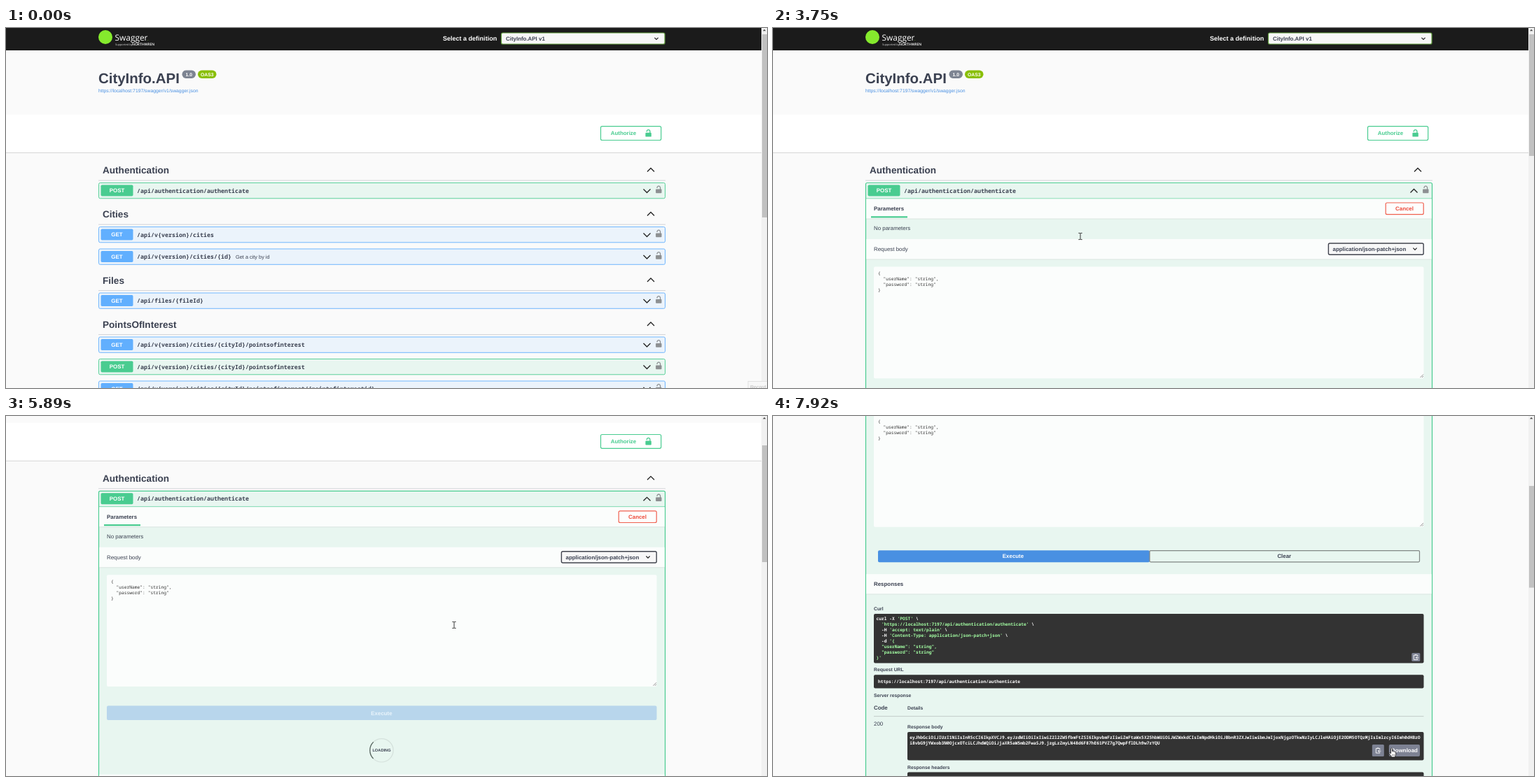
Write an HTML page that moves like this. It is 1087 by 515 pixels and loops after 7.99 s.

```html
<!DOCTYPE html>
<html lang="en">
<head>
<meta charset="utf-8">
<title>CityInfo.API</title>
<style>
html, body { margin: 0; width: 100%; height: 100%; overflow: hidden; background: #fafafa; }
svg { display: block; }
text { font-family: "Liberation Sans", Arial, sans-serif; white-space: pre; text-rendering: geometricPrecision; }
.mono { font-family: "Noto Sans Mono", monospace; }
.logo { font-family: "Open Sans", sans-serif; }
</style>
</head>
<body>
<svg id="stage" width="1087" height="515" viewBox="0 0 1087 515"></svg>
<script>
(() => {
const LOOP = 7990;
const INK = '#3b4151', GREEN = '#49cc90', BLUE = '#61affe', DARK = '#333', SLATE = '#7d8293', LIME = '#a2fca2';

const esc = s => s.replace(/&/g, '&amp;').replace(/</g, '&lt;');

// y is the middle of the capitals
function text(x, y, s, o = {}) {
  const { size = 7.92, fill = INK, w = 700, at = 'start', cls = '', extra = '' } = o;
  return `<text x="${x}" y="${(y + size * 0.35).toFixed(2)}" font-size="${size}" fill="${fill}" ` +
    `font-weight="${w}" text-anchor="${at}" class="${cls}" ${extra}>${o.raw ? s : esc(s)}</text>`;
}
const mid = (x, y, s, fill = INK, size = 7.92) => text(x, y, s, { fill, size, at: 'middle' });
const small = (x, y, s, o = {}) => text(x, y, s, { size: 6.8, ...o });
const code = (x, y, s, o = {}) => text(x, y, s, { size: 6.28, cls: 'mono', fill: '#fff', ...o });

function box(x1, y1, x2, y2, fill, o = {}) {
  const { r = 0, stroke = 'none', sw = 1.2, extra = '' } = o;
  return `<rect x="${x1}" y="${y1}" width="${x2 - x1}" height="${y2 - y1}" rx="${r}" ` +
    `fill="${fill}" stroke="${stroke}" stroke-width="${sw}" ${extra}/>`;
}
const line = (x1, x2, y, c, w = 0.7) => `<path d="M${x1} ${y}H${x2}" stroke="${c}" stroke-width="${w}"/>`;
const group = (inner, attrs = '') => `<g ${attrs}>${inner}</g>`;

function chevron(x, y, dir, w = 5, c = '#222', sw = 1.3) {
  const h = w / 2 * dir;
  return `<path d="M${x - w} ${y - h}L${x} ${y + h}L${x + w} ${y - h}" fill="none" stroke="${c}" stroke-width="${sw}"/>`;
}
function lock(x, y, c) {
  return `<g transform="translate(${x} ${y})"><rect x="-4.2" y="-.8" width="8.4" height="5.8" rx=".9" fill="${c}"/>` +
    `<path d="M-2.3 -2.2V-2.7a2.3 2.3 0 0 1 4.6 0V0" fill="none" stroke="${c}" stroke-width="1.3"/></g>`;
}
function clip(x, y, hw, hh) {
  return box(x - hw, y - hh, x + hw, y + hh, SLATE, { r: 1.5 }) +
    `<path d="M${x + 2.5} ${y - 1}V${y - 3}H${x - 3}V${y + 3.5}H${x + 2.5}V${y + 2.3}M${x + 4} ${y + .7}H${x}m1.4 -1.4l-1.4 1.4l1.4 1.4M${x - 1.4} ${y - 3.6}h2.4" ` +
    `fill="none" stroke="#fff" stroke-width=".9"/>`;
}

// Request rows
function bar(y, method, path, desc, open) {
  const c = method === 'POST' ? GREEN : BLUE;
  return (open ? '' : box(132.5, y - 11, 941.5, y + 11.3, c, { r: 2, stroke: c, sw: 0.9, extra: 'fill-opacity=".1"' })) +
    box(135.5, y - 8, 181.5, y + 8, c, { r: 1.7 }) + mid(158.5, y, method, '#fff') +
    text(187, y + 0.2, path, { size: 8.33, cls: 'mono' }) +
    (desc ? text(328, y, desc, { size: 7.35, w: 400 }) : '') +
    group(chevron(915.5, y + 0.5, open ? -1 : 1) + lock(932.3, y - 1.3, '#8d9092'), 'class="tail"') +
    group(clip(931.3, y, 4.8, 7.2), 'class="copy"');
}
const row = (y, ...rest) => group(bar(y, ...rest), `class="row" data-y="${y}"`);
const title = (y, s) => text(138, y, s, { size: 13.58 }) + chevron(921, y - 0.5, -1) +
  line(132, 942, y + 14.6, '#c0c2c7');

const AUTH = '/api/authentication/authenticate';
const CITIES = '/api/v{version}/cities';
const POINTS = CITIES + '/{cityId}/pointsofinterest';
const HOST = 'https://localhost:7197';

function header() {
  return box(0, -10, 1079, 32, '#1b1b1b') +
    '<circle cx="142" cy="13" r="10" fill="#85ea2d"/>' +
    text(155.5, 13.5, 'Swagger', { size: 11.9, fill: '#fff', w: 400, cls: 'logo' }) +
    text(202, 16, '.', { size: 6, fill: '#85ea2d', w: 400 }) +
    text(156, 23.5, 'Supported by', { size: 3.9, fill: '#ddd', w: 400, cls: 'logo' }) +
    text(180, 23.5, 'NORTHWREN', { size: 5, fill: '#fff', w: 600, cls: 'logo' }) +
    text(624, 14.5, 'Select a definition', { size: 9.03, fill: '#fff' }) +
    box(707.5, 7, 941, 23, '#f7f7f7', { r: 2, stroke: '#62a03f' }) +
    text(714, 15.2, 'CityInfo.API v1') + chevron(929, 15.2, 1, 2.6, '#222', 1.2) +
    text(132, 71.8, 'CityInfo.API', { size: 20.45 }) +
    box(251.5, 60.5, 271, 72, '#7d8492', { r: 5.7 }) + mid(261.3, 66.3, '1.0', '#fff', 6.8) +
    box(274, 60.5, 300.5, 72, '#89bf04', { r: 5.7 }) + mid(287.3, 66.3, 'OAS3', '#fff', 6.8) +
    small(132, 89.9, HOST + '/swagger/v1/swagger.json', { fill: '#4990e2', w: 400 }) +
    box(0, 124, 1079, 178, '#fff') + line(0, 1079, 178.5, '#d6d6d6', 1) +
    box(849.5, 140.7, 935.7, 160.5, '#fff', { r: 2, stroke: GREEN }) +
    mid(882, 150.6, 'Authorize', GREEN) + lock(917.6, 150.6, GREEN) +
    title(203.5, 'Authentication');
}

function rowList() {
  return row(232.5, 'POST', AUTH) +
    title(266.5, 'Cities') + row(295.5, 'GET', CITIES) + row(327, 'GET', CITIES + '/{id}', 'Get a city by id') +
    title(361, 'Files') + row(390, 'GET', '/api/files/{fileId}') +
    title(424, 'PointsOfInterest') + row(453, 'GET', POINTS) + row(484.5, 'POST', POINTS) +
    row(516, 'GET', POINTS + '/{pointofinterestid}');
}

const band = (y1, y2) => box(133, y1, 941, y2, '#fff', { extra: 'fill-opacity=".82"' }) + line(133, 941, y2, '#d5e0db', 0.8);

function panel() {
  return box(132.5, 221.5, 941.5, 1500, GREEN, { r: 2, stroke: GREEN, extra: 'fill-opacity=".1"' }) +
    row(232.5, 'POST', AUTH, '', true) + line(133, 941, 244, GREEN, 0.8) +
    band(244.4, 273) + text(144, 258.5, 'Parameters') + line(140, 192, 270.4, GREEN, 2.2) +
    text(144, 286, 'No parameters', { w: 400 }) +
    band(302, 331) + text(144, 316, 'Request body', { w: 400 }) +
    box(793.4, 308, 929.2, 324.2, '#f7f7f7', { r: 2, stroke: '#41444e', sw: 1.4 }) +
    text(799.5, 316, 'application/json-patch+json') + chevron(917, 316, 1, 2.6, '#222', 1.2);
}

const BODY = ['{', '  "userName": "string",', '  "password": "string"', '}'];
const span = (s, c) => `<tspan fill="${c}">${esc(s)}</tspan>`;

function responses(y) {
  return band(y, y + 28.7) + text(144, y + 14.2, 'Responses');
}
function table(y) {
  return responses(y) + text(144, y + 51.3, 'Code') + small(192, y + 51.3, 'Description') +
    text(897.5, y + 51.3, 'Links') + line(144, 929.5, y + 62.7, '#b3bdba') +
    text(144, y + 73.4, '200', { w: 400 }) + text(897, y + 73.4, 'No links', { w: 400, extra: 'font-style="italic"' });
}

function example() {
  const lines = BODY.map((s, i) => code(147.5, 368 + 8 * i,
    s.split(/(?<=: )("string")/).map(p => span(p, p === '"string"' ? LIME : '#fff')).join(''), { raw: true })).join('');
  return box(867.2, 250.2, 929.2, 266.8, '#fff', { r: 2, stroke: '#666' }) + mid(898.5, 258.5, 'Try it out') +
    small(144, 349.5, 'Example Value') + line(194.6, 195.2, 349.5, '#888', 6) + small(198.5, 349.5, 'Schema', { w: 400 }) +
    box(144, 360.5, 929.5, 401.7, DARK, { r: 2 }) + lines + table(436);
}

function editor() {
  return box(875.2, 250, 929.2, 266.7, '#fff', { r: 2, stroke: '#f0604f', extra: 'fill-opacity=".6"' }) +
    mid(902, 258.4, 'Cancel', '#ee4a3a') +
    box(144, 341.5, 929.5, 501.2, '#fff', { r: 2, extra: 'fill-opacity=".82"' }) +
    BODY.map((s, i) => code(150, 350.6 + 8 * i, s, { fill: '#333', w: 500 })).join('') +
    '<path d="M924.5 500l4.5 -4.5M927 500l2 -2" stroke="#777" stroke-width=".8"/>';
}

const wide = (c, label) => box(144, 528.6, 929.5, 549.2, c, { r: 2 }) + mid(536.5, 539, 'Execute', label);

function loading() {
  return wide('#b8d6ec', '#e9f4fb') + responses(627) +
    '<circle cx="536.5" cy="592.5" r="16.7" fill="none" stroke="#555" stroke-opacity=".13" stroke-width="1.2"/>' +
    '<path id="spin" d="M-11.8 -11.8A16.7 16.7 0 0 1 11.8 -11.8" fill="none" stroke="#52605a" stroke-width="1.2"/>' +
    mid(536.5, 592.5, 'LOADING', INK, 5.7);
}

// A made-up token with the usual three parts
function makeToken() {
  const claims = { sub: '1', given_name: 'Jonas', family_name: 'Veldt', city: 'Antwerp',
    nbf: 1683990722, exp: 1683994322, iss: HOST, aud: 'cityinfoapi' };
  const abc = 'ABCDEFGHIJKLMNOPQRSTUVWXYZabcdefghijklmnopqrstuvwxyz0123456789';
  let seed = 7, sign = '';
  while (sign.length < 43) {
    seed = (seed * 16807) % 2147483647;
    sign += abc[seed % abc.length];
  }
  const parts = [{ alg: 'HS256', typ: 'JWT' }, claims].map(o => btoa(JSON.stringify(o)).replace(/=/g, ''));
  return [...parts, sign].join('.');
}

function result() {
  const curl = ["curl -X 'POST' \\", `  '${HOST}${AUTH}' \\`, "  -H 'accept: text/plain' \\",
    "  -H 'Content-Type: application/json-patch+json' \\", "  -d '{", ...BODY.slice(1, 3), "}'"];
  let quoted = false;
  const lines = curl.map((s, i) => code(147.5, 632.6 + 8 * i, s.split(/(')/).map(p => {
    if (p !== "'") return span(p, quoted ? LIME : '#fff');
    quoted = !quoted;
    return span(p, LIME);
  }).join(''), { raw: true })).join('');
  const token = makeToken();
  return box(150, 534.6, 538, 551.6, '#4990e2', { r: 2 }) + mid(343, 543, 'Execute', '#fff') +
    box(538, 535, 923.5, 551.2, 'none', { r: 1.5, stroke: '#808684' }) + mid(730.3, 543, 'Clear') +
    responses(568.6) + small(144, 618.2, 'Curl') +
    box(144, 625.3, 929.5, 695.8, DARK, { r: 2 }) + lines + clip(918.3, 687.5, 6, 6) +
    small(144, 705.5, 'Request URL') + box(144, 712.6, 929.5, 732, DARK, { r: 2 }) +
    code(150, 722.4, HOST + AUTH) +
    small(144, 742, 'Server response') + text(144, 760, 'Code') + small(192, 760, 'Details') +
    line(144, 929.5, 772, '#b3bdba') + text(144, 782.5, '200', { w: 400 }) +
    small(192, 787.2, 'Response body') + box(192, 794.3, 929.5, 835, DARK, { r: 2 }) +
    code(195.3, 802, token.slice(0, 194)) + code(195.3, 810, token.slice(194)) +
    clip(864.3, 821, 8.5, 8.5) + box(879.8, 812.5, 924, 829.5, SLATE, { r: 2 }) + mid(902, 821, 'Download', '#fff') +
    small(192, 845, 'Response headers') + box(192, 852, 929.5, 900, DARK, { r: 2 });
}

// Pointers: tip at 0,0 (the text beam is centred)
const shapes = {
  arrow: '<path d="M0 0V9.6L2.2 7.6L3.6 10.8L5 10.2L3.6 7.1H6.6Z" fill="#fff" stroke="#222" stroke-width=".8"/>',
  hand: '<path d="M-1 .8Q0 -.6 1 .8V4.6Q2.2 4 2.8 5Q4.2 4.5 4.6 5.6Q6 5.3 6.2 6.6V9.4Q5.8 11 5.2 11.6V13H-.4V11.8L-3.6 7.6Q-3.4 6.2 -2.2 6.8L-1 8Z" fill="#fff" stroke="#222" stroke-width=".9"/>' +
    '<path d="M1 9v2M2.7 9v2M4.3 9v2" stroke="#222" stroke-width=".5"/>',
  beam: '<path d="M-2.6 -4.6H-.6L0 -4L.6 -4.6H2.6M0 -4V4M-2.6 4.6H-.6L0 4L.6 4.6H2.6" fill="none" stroke="#333" stroke-width="1"/>'
};

document.getElementById('stage').innerHTML =
  box(0, 0, 1087, 515, '#fafafa') +
  group(header() + group(rowList(), 'id="list"') +
    group(panel() + group(example(), 'id="example"') + group(editor(), 'id="editor"') +
      group(wide('#4990e2', '#fff') + table(561), 'id="ready"') +
      group(loading(), 'id="loading"') + group(result(), 'id="result"'), 'id="panel"') +
    '<rect id="focus" x="135.3" y="224.4" height="16.6" rx="1.5" fill="none" stroke="#22242e" stroke-width="1.4"/>', 'id="page"') +
  box(1079, 0, 1087, 515, '#f1f1f1') + '<path d="M1081 4.2L1083.2 1.8L1085.4 4.2Z" fill="#505050"/>' +
  '<rect id="thumb" x="1080" width="7" fill="#c1c1c1"/>' +
  group(box(1060, 505.5, 1090, 520, '#f7f7f7', { stroke: '#ddd', sw: 0.8 }) +
    group(text(1063, 513.2, 'Record', { size: 7, fill: '#b5b5b5', w: 400 }), 'id="label"'), 'id="tip"') +
  group(Object.entries(shapes).map(([k, s]) => group(s, `id="${k}"`)).join(''), 'id="pointer"');

const $ = id => document.getElementById(id);
const show = (el, on) => el.setAttribute('display', on ? 'inline' : 'none');
const rows = [...document.querySelectorAll('.row')].map(el => ({
  y: +el.dataset.y, tail: el.querySelector('.tail'), copy: el.querySelector('.copy')
}));

// time, x, y, pointer shape from then on
const track = [
  [230, 1068, 515, 'arrow'], [600, 968, 300, 'arrow'], [850, 908, 160, 'hand'], [960, 903, 151, 'hand'],
  [1150, 903, 151, 'hand'], [1350, 895, 175, 'arrow'], [1600, 881, 226, 'hand'], [1700, 880.5, 229, 'hand'],
  [1950, 880.5, 229, 'hand'], [2250, 889, 246, 'arrow'], [2500, 898, 256, 'hand'], [2740, 902, 261, 'hand'],
  [2800, 905.5, 258, 'hand'], [3120, 905.5, 258, 'arrow'], [3300, 760, 272, 'arrow'], [3400, 600, 350, 'beam'],
  [3680, 439, 298, 'beam'], [4300, 439, 298, 'beam'], [4600, 560, 388, 'hand'], [4750, 592, 421, 'hand'],
  [4900, 592, 421, 'arrow'], [5380, 592, 421, 'arrow'], [5560, 600, 387, 'beam'], [5680, 606, 353, 'beam'],
  [5790, 630, 312, 'beam'], [5890, 640, 299, 'beam'], [6190, 657, 291, 'beam'], [6700, 700, 277, 'beam'],
  [6960, 706, 272, 'arrow'], [7250, 711, 269, 'arrow'], [7500, 760, 290, 'arrow'], [7720, 853, 342, 'arrow'],
  [7860, 880, 450, 'arrow'], [7900, 883.5, 475, 'hand'], [LOOP, 883.5, 475, 'hand']
];

function pointerAt(t) {
  const i = track.findIndex((k, n) => n + 1 < track.length && t >= k[0] && t < track[n + 1][0]);
  if (i < 0) return null;
  const a = track[i], b = track[i + 1], u = (t - a[0]) / (b[0] - a[0]);
  return { x: a[1] + (b[1] - a[1]) * u, y: a[2] + (b[2] - a[2]) * u, kind: a[3] };
}

const ease = (t, from, to) => (1 - Math.cos(Math.PI * Math.min(1, Math.max(0, (t - from) / (to - from))))) / 2;
const STEPS = [1840, 3080, 4900, 6290];
const THUMBS = [[262, 0], [187, 0], [174, 0.303], [167, 0.289], [145.5, 0.266]];

function draw(t) {
  const state = STEPS.filter(s => t >= s).length;
  const scroll = 114.2 * ease(t, 3760, 4290) + 228.2 * ease(t, 6950, 7602);
  const p = pointerAt(t);

  $('page').setAttribute('transform', `translate(0 ${-scroll.toFixed(2)})`);
  show($('list'), state === 0);
  show($('panel'), state > 0);
  show($('example'), state === 1);
  show($('editor'), state > 1);
  show($('ready'), state === 2);
  show($('loading'), state === 3);
  show($('result'), state === 4);
  $('spin').setAttribute('transform', `translate(536.5 592.5) rotate(${(t - 5890) * 0.36 - 90})`);

  const over = y => !!p && p.x > 133 && p.x < 941 && Math.abs(p.y + scroll - y) < 11.2;
  for (const r of rows) {
    const on = over(r.y);
    r.tail.setAttribute('transform', `translate(${on ? -13.6 : 0} 0)`);
    show(r.copy, on);
  }
  show($('focus'), t >= 1740 && state < 2);
  $('focus').setAttribute('width', over(232.5) ? 772.5 : 786);

  const [h, ratio] = THUMBS[state];
  $('thumb').setAttribute('y', 9 + scroll * ratio);
  $('thumb').setAttribute('height', h);
  show($('tip'), t < 1170);
  show($('label'), t < 70);

  show($('pointer'), !!p);
  if (p) {
    $('pointer').setAttribute('transform', `translate(${p.x.toFixed(2)} ${p.y.toFixed(2)})`);
    for (const k in shapes) show($(k), k === p.kind);
  }
}

function tick() {
  draw(performance.now() % LOOP);
  requestAnimationFrame(tick);
}
tick();
})();
</script>
</body>
</html>
```
